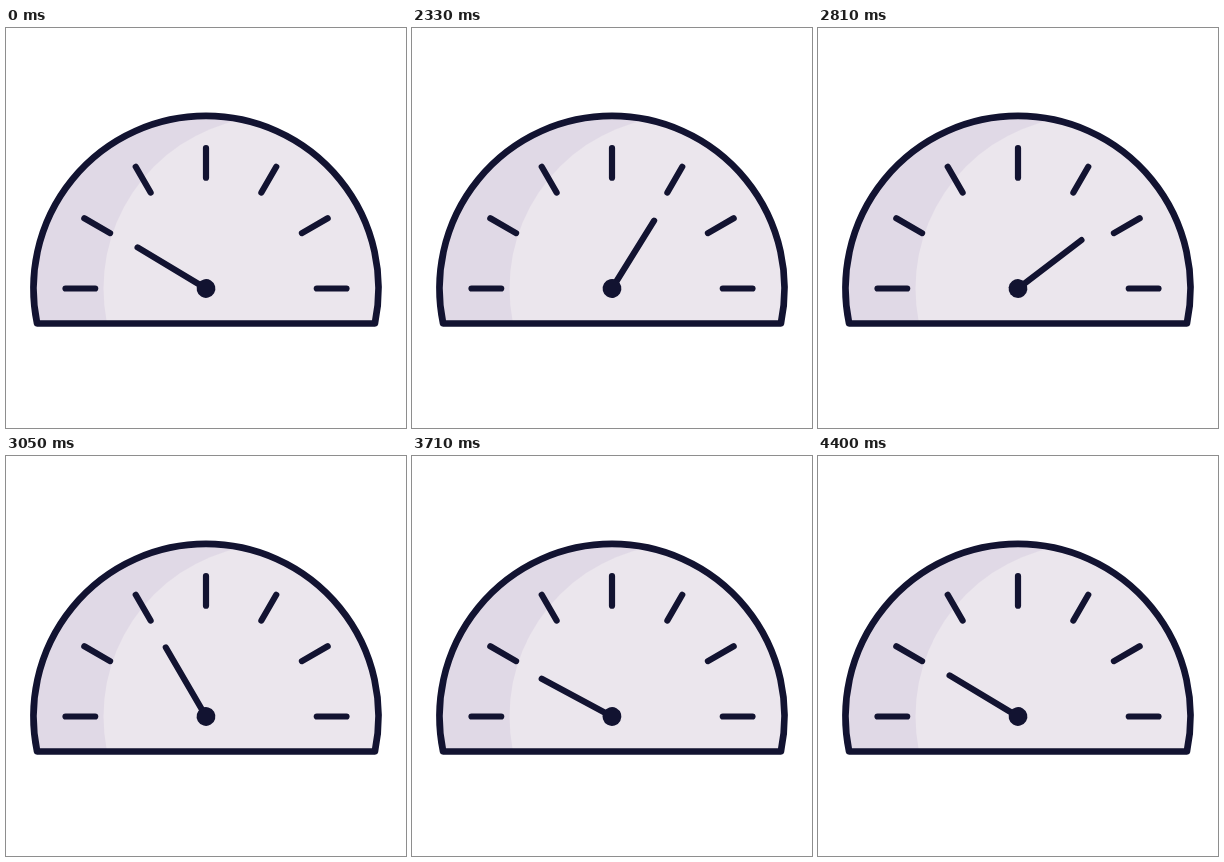
An HTML page that plays this animation: 400x400 px, repeating every 4430 ms.

```html
<!DOCTYPE html>
<html lang="en">
<head>
<meta charset="utf-8">
<title>Gauge</title>
<style>
  html, body { margin: 0; width: 100%; height: 100%; overflow: hidden; background: #fff; }
  svg { display: block; width: 100%; height: 100%; }
  .line { fill: none; stroke: #121331; stroke-width: 6.2; stroke-linecap: round; stroke-linejoin: round; }
  .rim { stroke-width: 6.7; }
</style>
</head>
<body>
<svg viewBox="0 0 400 400">
  <defs>
    <path id="dome" d="M31.1 295.5A172.5 172.5 0 1 1 368.9 295.5Z"/>
    <clipPath id="face"><use href="#dome"/></clipPath>
  </defs>
  <use href="#dome" fill="#e0d9e6"/>
  <circle cx="270" cy="260.5" r="172.5" fill="#ebe6ed" clip-path="url(#face)"/>
  <use href="#dome" class="line rim"/>
  <g id="ticks" class="line"></g>
  <g id="needle">
    <path class="line" d="M200 260.5V180.7"/>
    <circle cx="200" cy="260.5" r="9.4" fill="#121331"/>
  </g>
</svg>
<script>
const LOOP = 4430, STEP = 30, PHASE = 20;

// time in ms, angle from upright, x handles of the easing into this key
const KEYS = [
  [0, -59],
  [2000, -59, 1 / 3, 2 / 3],
  [2640, 61, 0.33, 0.3],
  [3250, -89, 0.78, 0.57],
  [3560, -44, 1 / 3, 2 / 3],
  [3840, -76, 1 / 3, 2 / 3],
  [4320, -59, 1 / 3, 2 / 3],
  [LOOP, -59, 1 / 3, 2 / 3]
];

const ticks = document.getElementById('ticks');
const needle = document.getElementById('needle');

for (let a = -90; a <= 90; a += 30) {
  const tick = document.createElementNS('http://www.w3.org/2000/svg', 'path');
  tick.setAttribute('d', 'M200 149.7V120');
  tick.setAttribute('transform', `rotate(${a} 200 260.5)`);
  ticks.append(tick);
}

// cubic Bezier easing with flat ends, solved by bisection
function ease(x, x1, x2) {
  let lo = 0, hi = 1;
  for (let i = 0; i < 24; i++) {
    const s = (lo + hi) / 2, r = 1 - s;
    if (3 * s * r * r * x1 + 3 * s * s * r * x2 + s * s * s < x) lo = s;
    else hi = s;
  }
  return lo * lo * (3 - 2 * lo);
}

function angleAt(t) {
  const i = KEYS.findIndex((key, n) => n > 0 && t <= key[0]);
  const [t0, a0] = KEYS[i - 1];
  const [t1, a1, x1, x2] = KEYS[i];
  return a0 + (a1 - a0) * ease((t - t0) / (t1 - t0), x1, x2);
}

const start = performance.now();

function draw() {
  const t = Math.max(0, performance.now() - start) % LOOP;
  const held = Math.max(0, Math.floor((t - PHASE + 0.5) / STEP) * STEP + PHASE);
  needle.setAttribute('transform', `rotate(${angleAt(held).toFixed(2)} 200 260.5)`);
  requestAnimationFrame(draw);
}
draw();
</script>
</body>
</html>
```
